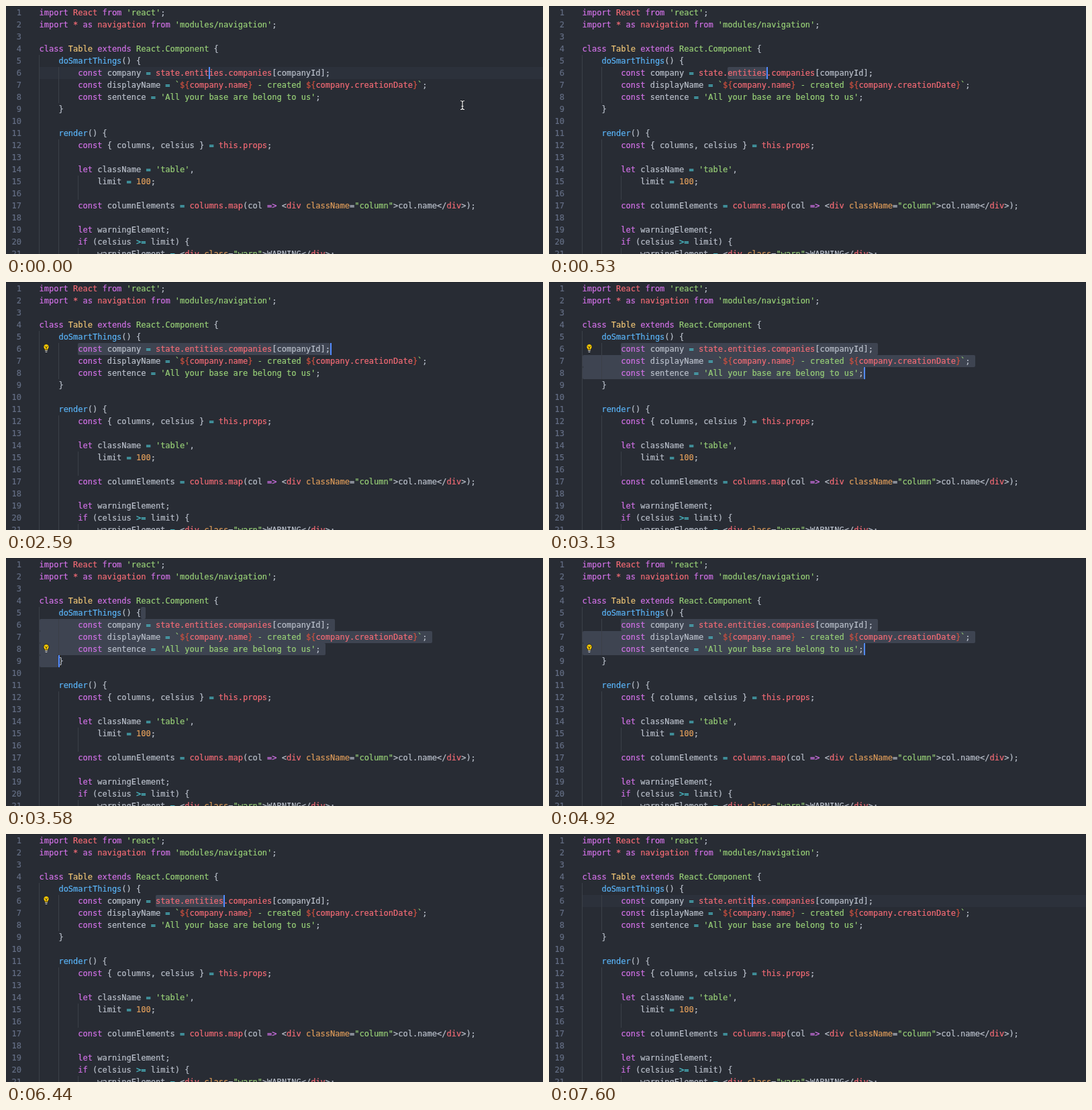
An HTML page that plays this animation: 800x370 px, repeating every 8000 ms.

```html
<!DOCTYPE html>
<html lang="en">
<head>
<meta charset="utf-8">
<title>Editor: expanding and shrinking a selection</title>
<style>
html, body { margin: 0; width: 100%; height: 100%; overflow: hidden; background: #282c34; }
#stage { position: relative; width: 800px; height: 370px; overflow: hidden; background: #282c34; }
#stage > *, #sel div { position: absolute; }
pre { margin: 0; top: 1px; font: 12px/18px "DejaVu Sans Mono", Menlo, monospace; -webkit-text-stroke: .2px; }
#code { left: 49.5px; }
#nums { left: 0; width: 23px; text-align: right; color: #636d83; }
#edge { width: 800px; height: 1px; background: #21252b; }
#row { left: 50px; top: 91px; width: 750px; height: 18px; background: #2c313b; }
#sel div { height: 18px; background: #3e4451; border-radius: 2px; }
.guide { width: 1px; background: #3b4048; }
#caret { width: 2px; height: 18px; background: #528bff; }
#bulb { left: 54px; }
#mouse { left: 674px; top: 139px; }
.f { color: #bac0cb } .p { color: #d171e6 } .r { color: #f46b75 } .g { color: #98d077 }
.b { color: #5ab4f8 } .y { color: #eec475 } .o { color: #de9c5a } .c { color: #4bbfca } .d { color: #d0503f }
</style>
</head>
<body>
<div id="stage">
  <div id="edge"></div>
  <div id="row"></div>
  <div id="sel"></div>
  <pre id="nums"></pre>
  <pre id="code"></pre>
  <div id="caret"></div>
  <svg id="bulb" width="12" height="16">
    <path d="M6 1.5a4.3 4.3 0 0 1 2.6 7.6q-.6.6-.6 1.9H4q0-1.3-.6-1.9A4.3 4.3 0 0 1 6 1.5Z" fill="#fc0" stroke="#23262c"/>
    <path d="M4 4.5 6 7 8 4.5M6 7v3.5" fill="none" stroke="#3a3417"/>
    <path d="M4.2 11.5h3.6M4.7 13.5h2.6" stroke="#c5c5c5"/>
  </svg>
  <svg id="mouse" width="12" height="18" fill="none">
    <path id="beam" d="M3 2.5q3 0 3 2v9q0 2-3 2M9 2.5q-3 0-3 2M6 13.5q0 2 3 2M4.5 10.5h3" stroke="#16181c" stroke-width="3"/>
    <use href="#beam" style="display:none"/>
    <path d="M3 2.5q3 0 3 2v9q0 2-3 2M9 2.5q-3 0-3 2M6 13.5q0 2 3 2M4.5 10.5h3" stroke="#f2f2f2" stroke-width="1.2"/>
  </svg>
</div>
<script>
const $ = id => document.getElementById(id);
const LEFT = 49.5, CHAR = 7.2246, LINE = 18, LOOP = 8000;
const colX = col => LEFT + col * CHAR;
const lineY = line => 1 + (line - 1) * LINE;

// "^" plus a letter switches the colour class
const lines = [
  "^pimport ^rReact ^pfrom ^g'react'^f;",
  "^pimport ^r* ^pas ^rnavigation ^pfrom ^g'modules/navigation'^f;",
  "",
  "^pclass ^yTable ^pextends ^gReact.Component ^f{",
  "    ^bdoSmartThings^f() {",
  "        ^pconst ^fcompany ^c= ^rstate.entities.companies^f[companyId];",
  "        ^pconst ^fdisplayName ^c= ^g`^d${^rcompany.name^d}^g - created ^d${^rcompany.creationDate^d}^g`^f;",
  "        ^pconst ^fsentence ^c= ^g'All your base are belong to us'^f;",
  "    }",
  "",
  "    ^brender^f() {",
  "        ^pconst ^f{ columns, celsius } ^c= ^rthis.props^f;",
  "",
  "        ^plet ^fclassName ^c= ^g'table'^f,",
  "            limit ^c= ^o100^f;",
  "",
  "        ^pconst ^fcolumnElements ^c= ^rcolumns.map^f(col ^p=> ^f<^rdiv ^oclassName^f=^g\"column\"^f>col.name</^rdiv^f>);",
  "",
  "        ^plet ^fwarningElement;",
  "        ^pif ^f(celsius ^c>= ^flimit) {",
  "            warningElement ^c= ^f<^rdiv ^oclass^f=^g\"warn\"^f>WARNING</^rdiv^f>;"
];
const lengths = lines.map(s => s.replace(/\^./g, "").length);

lines.forEach(line => {
  ("^f" + line + "\n").split("^").slice(1).forEach(part => {
    const span = document.createElement("span");
    span.className = part[0];
    span.textContent = part.slice(1);
    $("code").append(span);
  });
});
$("nums").textContent = lines.map((_, i) => i + 1).join("\n");

// column, first line, line after the last
[[0, 5, 22], [4, 6, 9], [4, 12, 22], [8, 15, 17], [8, 21, 22]].forEach(([col, from, to]) => {
  const guide = document.createElement("div");
  guide.className = "guide";
  guide.style.cssText = `left:${Math.floor(colX(col))}px;top:${lineY(from)}px;height:${(to - from) * LINE}px`;
  $("stage").insertBefore(guide, $("nums"));
});

// each range: start line, start column, end line, end column
const caretOnly = [6, 35, 6, 35], word = [6, 30, 6, 38], pair = [6, 24, 6, 38],
  path = [6, 24, 6, 48], lookup = [6, 24, 6, 59], assign = [6, 14, 6, 59],
  statement = [6, 8, 6, 60], block = [6, 8, 8, 58], body = [5, 21, 9, 4];

const ranges = [
  [0, caretOnly], [530, word], [980, pair], [1340, path], [1790, lookup], [2150, assign],
  [2590, statement], [3130, block], [3580, body], [4650, block], [5010, statement],
  [5370, assign], [5640, lookup], [6000, path], [6440, pair], [7070, word], [7600, caretOnly]
];
const bulbLines = [[0, 0], [1250, 6], [3400, 8], [3850, 9], [4920, 8], [5280, 6], [7330, 0]];
const caretOff = [[90, 530], [4020, 4560], [6980, 7070], [7510, 7600]];

const at = (track, t) => track.findLast(([start]) => start <= t)[1];
const show = (el, on) => el.style.visibility = on ? "visible" : "hidden";
const place = (el, x, y) => { el.style.left = x + "px"; el.style.top = y + "px"; };

let drawn;
function drawSelection(range) {
  if (range === drawn) return;
  drawn = range;
  const [l1, c1, l2, c2] = range;
  $("sel").replaceChildren();
  for (let line = l1; line <= l2; line++) {
    const from = line === l1 ? c1 : 0;
    const to = line === l2 ? c2 : lengths[line - 1] + 1;
    const box = document.createElement("div");
    place(box, colX(from), lineY(line));
    box.style.width = (to - from) * CHAR + "px";
    $("sel").append(box);
  }
  place($("caret"), Math.round(colX(c2)), lineY(l2));
  show($("row"), range === caretOnly);
}

function frame(now) {
  const t = now % LOOP;
  drawSelection(at(ranges, t));
  show($("caret"), !caretOff.some(([a, b]) => t >= a && t < b));
  const bulbLine = at(bulbLines, t);
  show($("bulb"), bulbLine);
  $("bulb").style.top = lineY(bulbLine) + "px";
  show($("mouse"), t < 90);
  requestAnimationFrame(frame);
}
frame(0);
</script>
</body>
</html>
```
